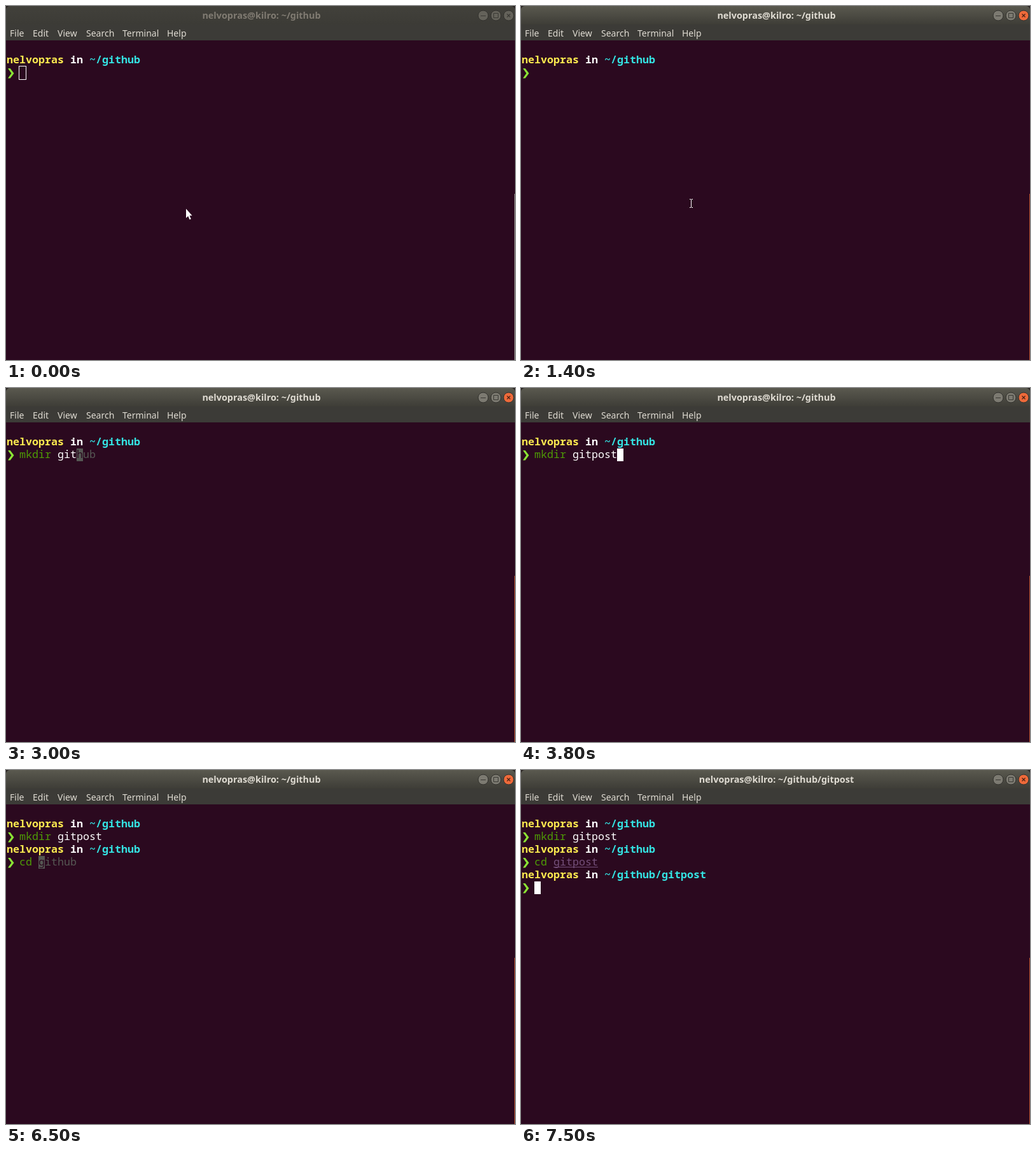
Write an HTML page with a canvas that moves like this. It is 800 px wide and 556 px high and loops after 8 s.

```html
<!DOCTYPE html>
<html lang="en">
<head>
<meta charset="utf-8">
<title>Terminal</title>
<style>
  html, body { margin: 0; width: 100%; height: 100%; overflow: hidden; background: #2b091f; }
  canvas { display: block; }
</style>
</head>
<body>
<canvas id="stage" width="800" height="556"></canvas>
<script>
const ctx = document.getElementById('stage').getContext('2d');
const LOOP = 8000, CELL = 10, ROW = 20, TOP = 55;
const USER = 'nelvopras', HOST = 'kilro';
const MONO = '16.667px "Noto Sans Mono", "DejaVu Sans Mono", monospace';
const SANS = '"Noto Sans", "Open Sans", sans-serif';
const C = {
  bg: '#2b091f', white: '#ffffff', yellow: '#fce94f', cyan: '#34e2e2', lime: '#8ae234',
  green: '#4e9a06', red: '#ef2929', grey: '#555753', purple: '#75507b'
};
const MENU = [['File', 6], ['Edit', 42], ['View', 81], ['Search', 126], ['Terminal', 183], ['Help', 253]];

// Each step changes part of the state: cmds holds the typed lines, hint the
// grey suggestion, cur the block cursor, busy a command that has been entered.
const steps = [
  [0, { focus: false, cwd: ['~/github'], cmds: [''], hint: '', cur: true, busy: false, mouse: 'arrow', at: [283, 318] }],
  [100, { mouse: 'beam', at: [285, 313] }],
  [300, { at: [284, 312] }],
  [500, { at: [271, 305] }],
  [600, { at: [267, 303] }],
  [800, { focus: true }],
  [1400, { cur: false }],
  [2000, { cur: true }]
];
const step = (t, change) => steps.push([t, change]);
const type = (t, before, text, gap = 100) => [...text].forEach((_, i) =>
  step(t + i * gap, { cmds: [...before.slice(0, -1), before.at(-1) + text.slice(0, i + 1)], cur: true, mouse: '' }));

type(2100, [''], 'mkdir ');
type(2800, ['mkdir '], 'git');
step(2800, { hint: 'ithub' });
step(2900, { hint: 'thub' });
step(3000, { hint: 'hub' });
type(3500, ['mkdir git'], 'post');
step(3500, { hint: '' });
step(4400, { cur: false });
step(4900, { cur: true, busy: true });
const first = 'mkdir gitpost';
step(5100, { busy: false, cwd: ['~/github', '~/github'], cmds: [first, ''] });
step(5500, { cmds: [first, 'c'], hint: 'lear' });
step(5600, { cmds: [first, 'cd '], hint: '' });
step(5900, { hint: 'github', cur: false });
step(6500, { cur: true });
step(6600, { cmds: [first, 'cd gi'], hint: 'thub' });
step(6700, { cmds: [first, 'cd git'], hint: 'hub' });
step(6900, { cmds: [first, 'cd gitp'], hint: '' });
step(7100, { cmds: [first, 'cd gitpos'] });
step(7300, { cmds: [first, 'cd gitpost'] });
step(7400, { busy: true });
step(7500, { busy: false, cwd: ['~/github', '~/github', '~/github/gitpost'], cmds: [first, 'cd gitpost', ''] });
steps.sort((a, b) => a[0] - b[0]);

function stateAt(t) {
  const s = {};
  for (const [time, change] of steps) if (time <= t) Object.assign(s, change);
  return s;
}

function rect(color, x, y, w, h) {
  ctx.fillStyle = color;
  ctx.fillRect(x, y, w, h);
}

function poly(color, points) {
  ctx.beginPath();
  points.forEach(([x, y]) => ctx.lineTo(x, y));
  ctx.closePath();
  ctx.fillStyle = color;
  ctx.fill();
}

const colX = col => 1 + col * CELL;
const rowY = row => TOP + row * ROW;

function put(text, col, row, color, bold) {
  ctx.font = (bold ? 'bold ' : '') + MONO;
  ctx.fillStyle = color;
  ctx.fillText(text, colX(col), rowY(row) + 15);
}

function button(x, fill, ink, kind) {
  ctx.beginPath();
  ctx.arc(x, 15, 8, 0, Math.PI * 2);
  ctx.fillStyle = fill;
  ctx.fill();
  ctx.strokeStyle = '#33322e';
  ctx.lineWidth = 1;
  ctx.stroke();
  ctx.strokeStyle = ink;
  ctx.beginPath();
  if (kind === 'min') { ctx.moveTo(x - 4, 15.5); ctx.lineTo(x + 4, 15.5); }
  if (kind === 'max') ctx.rect(x - 3.5, 11.5, 7, 7);
  if (kind === 'close') {
    ctx.lineWidth = 1.3;
    ctx.moveTo(x - 2.5, 12.5); ctx.lineTo(x + 2.5, 17.5);
    ctx.moveTo(x + 2.5, 12.5); ctx.lineTo(x - 2.5, 17.5);
  }
  ctx.stroke();
}

function drawWindow(s) {
  rect(C.bg, 0, 0, 800, 556);
  rect('#26211f', 0, 0, 800, 10);
  const bar = ctx.createLinearGradient(0, 0, 0, 29);
  bar.addColorStop(0, s.focus ? '#5a594f' : '#42413b');
  bar.addColorStop(1, s.focus ? '#3e3d37' : '#3c3b36');
  ctx.fillStyle = bar;
  ctx.beginPath();
  ctx.roundRect(0, 0, 800, 40, [6, 6, 0, 0]);
  ctx.fill();
  rect('#3c3b37', 0, 29, 800, 25);

  ctx.font = 'bold 14.4px ' + SANS;
  ctx.textAlign = 'center';
  ctx.fillStyle = s.focus ? '#dfdbd2' : '#807b72';
  ctx.fillText(`${USER}@${HOST}: ${s.busy && s.cmds.length === 2 ? '~/github/gitpost' : s.cwd.at(-1)}`, 401.5, 20);
  ctx.textAlign = 'left';

  ctx.font = '14px ' + SANS;
  ctx.fillStyle = '#dfdbd2';
  for (const [label, x] of MENU) ctx.fillText(label, x, 48);

  const grey = s.focus ? '#7c7a71' : '#64625a';
  button(750, grey, '#3a3934', 'min');
  button(770, grey, '#3a3934', 'max');
  button(790, s.focus ? '#ee6a3a' : grey, s.focus ? '#4a2014' : '#3a3934', 'close');
  rect(s.focus ? '#b9532f' : '#96918d', 799, 295, 1, 261);
}

function drawPrompt(row, cwd) {
  put(USER, 0, row, C.yellow, true);
  put('in', 10, row, C.white, true);
  put(cwd, 13, row, C.cyan, true);
  const y = rowY(row + 1);
  poly(C.lime, [[3, y + 3], [6.7, y + 3], [12.5, y + 10.7], [6.7, y + 18.5], [3, y + 18.5], [8.4, y + 10.7]]);
}

function drawCommand(text, row) {
  const [name, arg] = text.split(' ');
  const known = name === 'mkdir' || name === 'cd';
  put(name, 2, row, known ? C.green : C.red, !known);
  if (!arg) return;
  const col = 3 + name.length;
  const path = text === 'cd gitpost';
  put(arg, col, row, path ? C.purple : C.white);
  if (path) rect(C.purple, colX(col), rowY(row) + 17, arg.length * CELL, 1);
}

function drawCursor(s, col, row) {
  const x = colX(col), y = rowY(row);
  if (!s.focus) {
    ctx.strokeStyle = C.white;
    ctx.lineWidth = 1;
    ctx.strokeRect(x - 0.5, y - 0.5, 11, 21);
    return;
  }
  rect(s.hint ? C.grey : C.white, x, y, CELL, ROW);
  if (s.hint) put(s.hint[0], col, row, C.bg);
}

function drawMouse(kind, [x, y]) {
  if (kind === 'arrow') {
    const shape = [[0, 0.5], [0, 15], [3.2, 12], [5.6, 17.4], [7.8, 16.4], [5.5, 11.3], [9.6, 11.3]];
    poly(C.white, shape.map(([dx, dy]) => [x + dx, y + dy]));
  }
  if (kind === 'beam') {
    rect(C.white, x, y + 1, 1, 12);
    for (const dy of [0, 13]) {
      rect(C.white, x - 2, y + dy, 2, 1);
      rect(C.white, x + 1, y + dy, 2, 1);
    }
  }
}

function draw(t) {
  const s = stateAt(t);
  drawWindow(s);
  s.cmds.forEach((cmd, i) => {
    drawPrompt(1 + 2 * i, s.cwd[i]);
    drawCommand(cmd, 2 + 2 * i);
  });
  const row = 2 * s.cmds.length, col = 2 + s.cmds.at(-1).length;
  put(s.hint, col, row, C.grey);
  if (s.cur) s.busy ? drawCursor(s, 0, row + 1) : drawCursor(s, col, row);
  drawMouse(s.mouse, s.at);
}

const start = performance.now();
function tick() {
  draw((performance.now() - start) % LOOP);
  requestAnimationFrame(tick);
}
tick();
</script>
</body>
</html>
```
